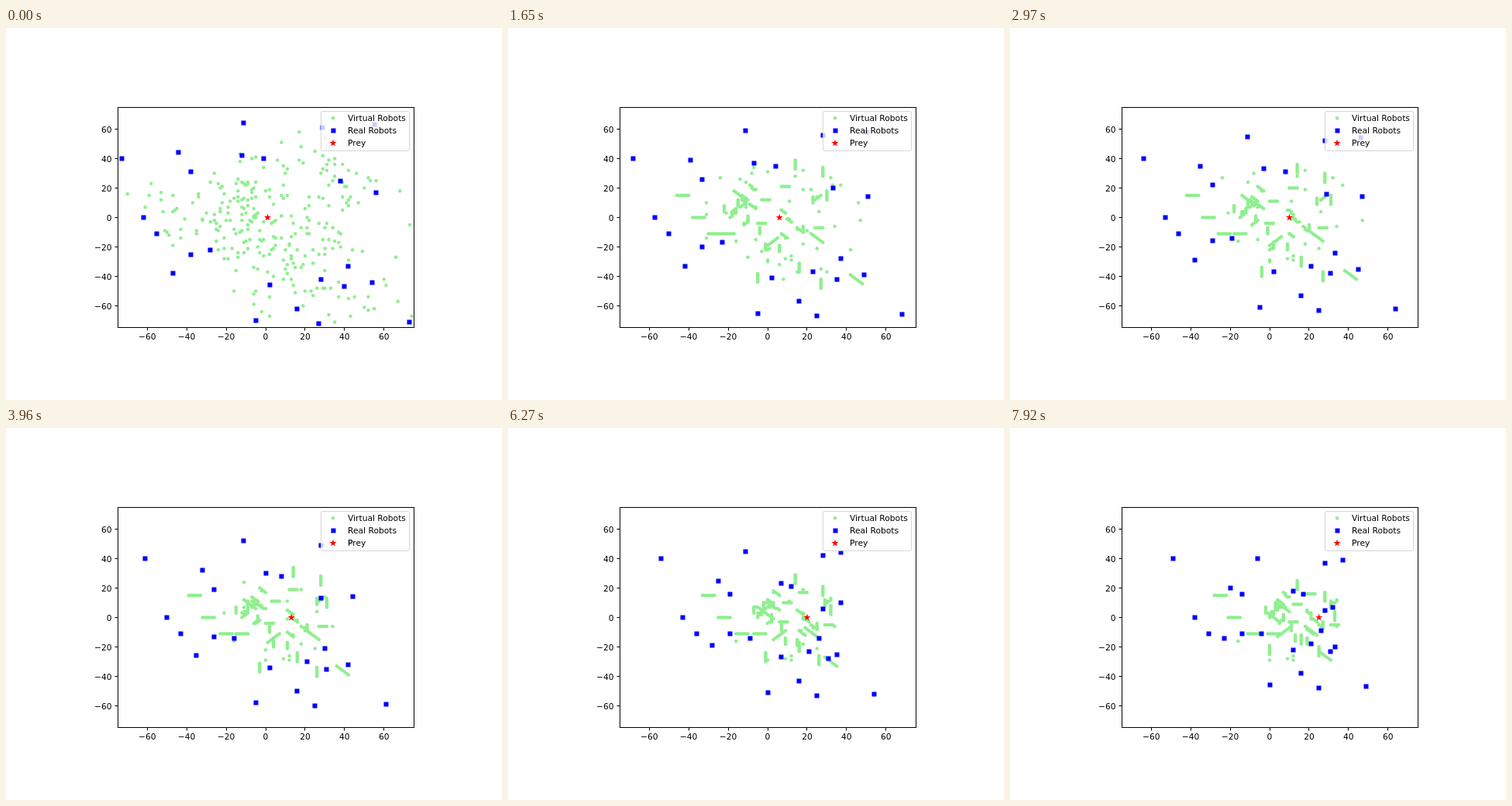
Animation of 640x480 px, one loop 8 s. Source, as an HTML page with a canvas:

```html
<!DOCTYPE html>
<html lang="en">
<head>
<meta charset="utf-8">
<title>Robots and prey</title>
<style>
  html, body { margin: 0; width: 100%; height: 100%; overflow: hidden; background: #fff; }
  canvas { display: block; }
</style>
</head>
<body>
<canvas id="stage" width="640" height="480"></canvas>
<script>
const ctx = document.getElementById('stage').getContext('2d');
const LOOP = 8000, STEP = 330, LAST = 24, GATHERED = 5;
const LEFT = 144.5, TOP = 102.5, WIDTH = 382, HEIGHT = 284;
const px = x => 335 + x * 2.5467;
const py = y => 244.5 - y * 1.9;
const snap = v => Math.floor(v) + 0.5;
const mix = (a, b, k) => a + (b - a) * k;

let seed = 11;
function random(from = 0, to = 1) {
  seed = (seed * 16807) % 2147483647;
  return mix(from, to, seed / 2147483647);
}

function inDisc() {
  const angle = random(0, Math.PI * 2), radius = Math.sqrt(random());
  return [radius * Math.cos(angle), radius * Math.sin(angle), radius];
}

// Real robots move one unit per step on each axis until they are there:
// start x, y, end x, y, and for some a turn as step, x, y.
const robots = [
  [-73, 40, -49, 40], [-62, 0, -38, 0], [-55, -11, -31, -11], [-47, -38, -23, -14],
  [-44, 44, -20, 20], [-38, 31, -14, 16], [-38, -25, -14, -11],
  [-28, -22, -4, -11, 19, -9, -14], [-11, 64, -6, 40, 19, -11, 45],
  [-12, 42, 12, 18], [-1, 40, 17, 16, 15, 8, 25], [29, 61, 28, 37],
  [55, 63, 37, 39], [38, 25, 28, 5], [56, 17, 32, 7, 15, 41, 14],
  [42, -33, 26, -9], [54, -44, 33, -20], [40, -47, 31, -23], [28, -42, 21, -18],
  [2, -46, 12, -22, 14, 2, -32], [16, -62, 16, -38], [-5, -70, 0, -46, 14, -5, -56],
  [27, -72, 25, -48], [73, -71, 49, -47]
];

const toward = (a, b, n) => a + Math.sign(b - a) * Math.min(n, Math.abs(b - a));

function robotAt([x, y, endX, endY, turn = 0, turnX = x, turnY = y], step) {
  return step < turn
    ? [toward(x, turnX, step), toward(y, turnY, step)]
    : [toward(turnX, endX, step - turn), toward(turnY, endY, step - turn)];
}

// Main files of virtual robots, from centre x, y to centre x, y.
const marches = [
  [-43, 15, -25, 15], [-35, 0, -18, 0], [-27, -11, -8, -11], [-20, -11, 2, -11],
  [14, 36, 14, 22], [28, 31, 28, 14], [30, 15, 33, 1], [-14, 15, 2, 0],
  [2, -17, 7, -10], [25, -14, 21, -9], [16, -34, 16, -15], [27, -45, 25, -23],
  [-5, -41, 0, -22], [45, -42, 28, -26]
];

const swarm = [];

// Every dot starts scattered outwards from its place in the gathered swarm.
function addDot(x, y, dx, dy, until) {
  const start = [2 + x * 1.3 + random(-12, 12), y * 1.3 - 2 + random(-12, 12)];
  swarm.push({ start, x, y, dx, dy, until });
}

// A file of dots, lined up along its heading.
function addFile(x, y, dx, dy, headingX, headingY, count) {
  for (let i = 0; i < count; i++) {
    const k = i - (count - 1) / 2;
    addDot(x + headingX * k, y + headingY * k, dx, dy, LAST);
  }
}

for (const [x, y, endX, endY] of marches) {
  const dx = endX - x, dy = endY - y, most = Math.max(Math.abs(dx), Math.abs(dy));
  addFile(x, y, dx, dy, Math.round(dx / most), Math.round(dy / most), 7);
}
for (let i = 0; i < 25; i++) {
  const [u, v] = inDisc(), angle = Math.floor(random(0, 8)) * Math.PI / 4;
  const x = 4 + u * 27, y = 1 + v * 23;
  addFile(x, y, 13 - u * 7, -v * 6, Math.cos(angle), Math.sin(angle), 5);
}
for (let i = 0; i < 45; i++) {
  const [u, v, radius] = inDisc();
  addDot(8 + u * 49, v * 44, 0, 0, random(6, radius > 0.7 ? 12 : LAST + 6));
}

function virtualAt({ start, x, y, dx, dy }, step) {
  const left = 1 - Math.min(step / GATHERED, 1);
  const gather = 1 - left * left;
  const drift = Math.max(0, step - GATHERED) / (LAST - GATHERED);
  return [
    Math.round(mix(start[0], x, gather) + dx * drift),
    Math.round(mix(start[1], y, gather) + dy * drift)
  ];
}

function dot(x, y) {
  ctx.fillStyle = '#90ee90';
  ctx.beginPath();
  ctx.arc(x, y, 2.25, 0, Math.PI * 2);
  ctx.fill();
}

function square(x, y) {
  ctx.fillStyle = '#00f';
  ctx.fillRect(snap(x) - 3, snap(y) - 3, 6, 6);
}

function star(x, y) {
  ctx.fillStyle = '#f00';
  ctx.beginPath();
  for (let i = 0; i < 10; i++) {
    const r = i % 2 ? 1.9 : 4.8, a = i * Math.PI / 5;
    ctx.lineTo(x + r * Math.sin(a), y - r * Math.cos(a));
  }
  ctx.fill();
}

function label(text, x, y, align) {
  ctx.fillStyle = '#000';
  ctx.textAlign = align;
  ctx.fillText(text, x, y);
}

function drawAxes() {
  ctx.strokeStyle = '#000';
  ctx.lineWidth = 1;
  ctx.strokeRect(LEFT, TOP, WIDTH, HEIGHT);
  ctx.beginPath();
  for (let v = -60; v <= 60; v += 20) {
    const x = snap(px(v)), y = snap(py(v));
    const text = String(v).replace('-', '\u2212');
    ctx.moveTo(x, TOP + HEIGHT);
    ctx.lineTo(x, TOP + HEIGHT + 4);
    ctx.moveTo(LEFT, y);
    ctx.lineTo(LEFT - 4, y);
    label(text, px(v), 402.4, 'center');
    label(text, 136.5, py(v) + 4, 'right');
  }
  ctx.stroke();
}

function drawLegend() {
  ctx.beginPath();
  ctx.roundRect(406.5, 107.5, 114, 51, 2);
  ctx.fillStyle = 'rgba(255,255,255,0.8)';
  ctx.fill();
  ctx.strokeStyle = 'rgba(204,204,204,0.8)';
  ctx.stroke();
  [['Virtual Robots', dot], ['Real Robots', square], ['Prey', star]].forEach(([text, mark], i) => {
    const y = 116.2 + i * 16.2;
    mark(422, y);
    label(text, 441, y + 3.6, 'left');
  });
}

function draw() {
  const step = Math.floor((performance.now() % LOOP) / STEP);
  ctx.fillStyle = '#fff';
  ctx.fillRect(0, 0, 640, 480);
  ctx.font = '10.69px "DejaVu Sans", sans-serif';
  ctx.save();
  ctx.beginPath();
  ctx.rect(LEFT, TOP, WIDTH, HEIGHT);
  ctx.clip();
  for (const member of swarm) {
    if (step > member.until) continue;
    const [x, y] = virtualAt(member, step);
    dot(px(x), py(y));
  }
  for (const path of robots) {
    const [x, y] = robotAt(path, step);
    square(px(x), py(y));
  }
  star(px(1 + step), py(0));
  ctx.restore();
  drawAxes();
  drawLegend();
  requestAnimationFrame(draw);
}
draw();
</script>
</body>
</html>
```
